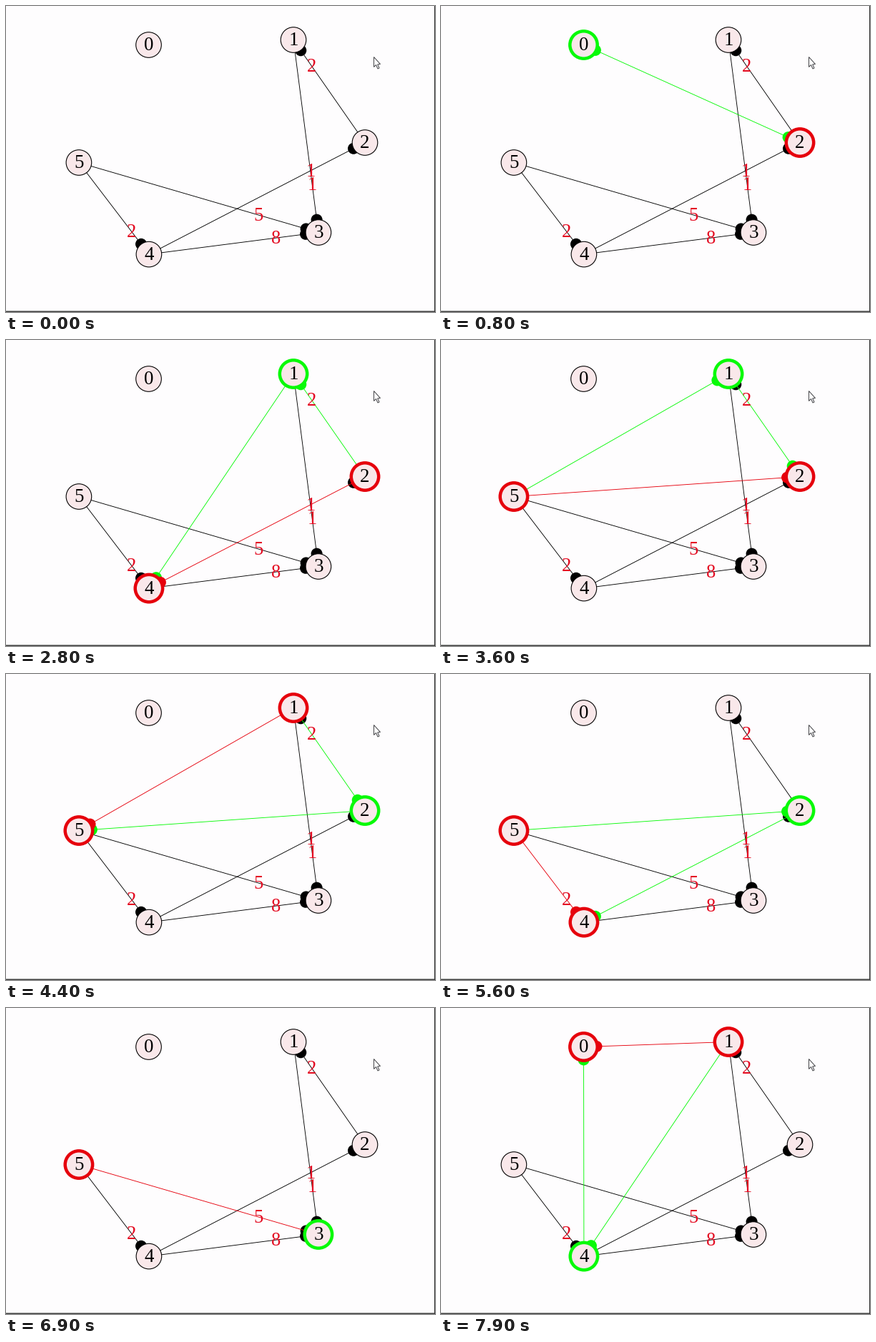
Animation, 600 px wide and 429 px high, one loop 8000 ms. Source, as a matplotlib script:

```python
from itertools import combinations, permutations

import numpy as np
import matplotlib.pyplot as plt
from matplotlib.animation import FuncAnimation
from matplotlib.patches import Circle, Polygon

W, H, DPI = 600, 429, 64
PX = 72 / DPI  # points per pixel
FRAMES, INTERVAL = 80, 100
RATE, LAG = 1.92, 1.1  # algorithm steps per frame, delay before the first

INK, GREEN, RED = "black", "#08fa08", "#e6000c"
PAPER, FILL = "#fefdfe", "#f9e8ea"
LAYER = {INK: 1, GREEN: 2, RED: 3}

NODES = np.array([(199, 54), (401.5, 47), (501.5, 191),
                  (436.4, 317), (199.4, 347.6), (101.4, 219)])
SIZE = len(NODES)
WEIGHTS = {(1, 3): 1, (2, 1): 2, (4, 2): 1, (5, 3): 5, (4, 3): 8, (5, 4): 2}
ARROW = [(0, 0), (0, 14), (3, 11), (5.5, 16.5), (7.5, 15.5), (5.2, 10.3), (9, 10)]

fig = plt.figure(figsize=(W / DPI, H / DPI), dpi=DPI, facecolor=PAPER)
ax = fig.add_axes([0, 0, 1, 1])
ax.set_xlim(-0.5, W - 0.5)
ax.set_ylim(H - 0.5, -0.5)
ax.axis("off")


def draw_text(pos, value, color, size):
    ax.text(*pos, str(value), color=color, fontsize=size * PX,
            family="Liberation Serif", ha="center", va="center", zorder=9)


def make_line(a, b):
    return ax.plot(*NODES[[a, b]].T, lw=0.9 * PX)[0]


def make_head(a, b):
    """Round arrow head of a -> b, half tucked under node b."""
    p, q = NODES[a], NODES[b]
    pos = q + (p - q) / np.linalg.norm(p - q) * 18
    return ax.add_patch(Circle(pos, 8, lw=0))


def paint(parts, colors, z):
    """Show only the parts that have a color, stacked by that color."""
    for key, part in parts.items():
        part.set_visible(key in colors)
        if key in colors:
            part.set(color=colors[key], zorder=LAYER[colors[key]] + z)


lines = {frozenset(p): make_line(*p) for p in combinations(range(SIZE), 2)}
heads = {p: make_head(*p) for p in permutations(range(SIZE), 2)}
rings = [ax.add_patch(Circle(p, fc=FILL, zorder=6)) for p in NODES]

for n, pos in enumerate(NODES):
    draw_text(pos + (0, 1), n, INK, 27)
for (a, b), weight in WEIGHTS.items():
    spot = NODES[a] + 0.75 * (NODES[b] - NODES[a])
    draw_text(spot + (0, 1.5), weight, "#e40c22", 26.5)

ax.add_patch(Polygon(np.add(ARROW, (514, 71)), fc="white", ec="#444448",
                     lw=PX, zorder=10))
ax.axhspan(427, H - 0.5, color="#404040", lw=0, snap=False)
ax.axvspan(W - 1.5, W - 0.5, color="#303030", lw=0, snap=False)


def update(frame):
    line_colors = {frozenset(e): INK for e in WEIGHTS}
    head_colors = dict.fromkeys(WEIGHTS, INK)
    node_colors = {}

    step = int(np.floor(RATE * frame - LAG))
    if step >= 0:
        k, rest = divmod(step, SIZE**2)
        i, j = divmod(rest, SIZE)
        for a, b, color in ((i, k, GREEN), (k, j, GREEN), (i, j, RED)):
            if a != b:
                line_colors[frozenset((a, b))] = color
                if k not in (i, j):
                    head_colors[a, b] = color
        node_colors = {i: RED, j: RED, k: GREEN}
        node_colors[k] = GREEN

    paint(lines, line_colors, 0)
    paint(heads, head_colors, 0.5)
    for n, ring in enumerate(rings):
        marked = n in node_colors
        ring.set(edgecolor=node_colors.get(n, INK),
                 radius=19.2 if marked else 17.8,
                 linewidth=(4.5 if marked else 1.1) * PX)


anim = FuncAnimation(fig, update, frames=FRAMES, init_func=lambda: update(0),
                     interval=INTERVAL, repeat=True, repeat_delay=0, blit=False)
plt.show()
```
